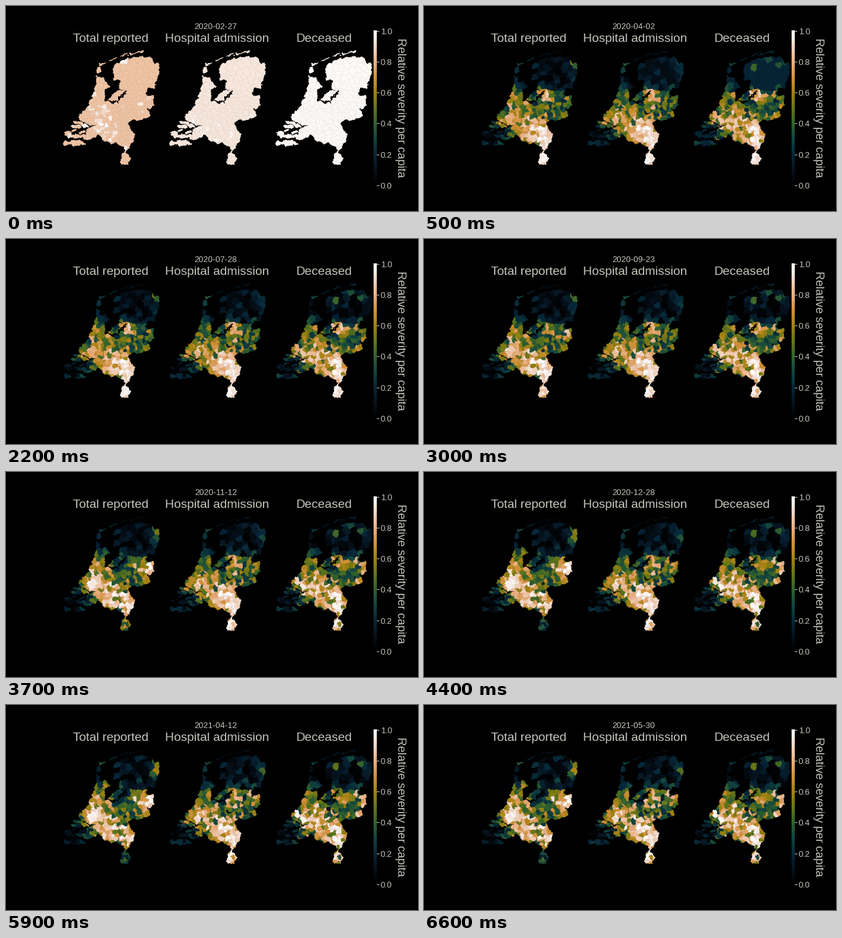
Recreate the animation shown at these times as a matplotlib script. Size 640x320 px, loop 6.7 s.

```python
import numpy as np
import matplotlib.pyplot as plt
from matplotlib.animation import FuncAnimation
from matplotlib.colors import LinearSegmentedColormap
from matplotlib.path import Path

W, H, DPI = 640, 320, 100
FRAMES, INTERVAL = 67, 100
INK = "#c6c6bd"
rng = np.random.default_rng(12)

plt.rcParams["font.family"] = "Liberation Sans"
cmap = LinearSegmentedColormap.from_list("dusk", [
    "#000000", "#06121d", "#06283a", "#12443f", "#31612f", "#667619",
    "#a0820f", "#d2913a", "#eab083", "#f2d6c4", "#ffffff"], N=512)

# Key points of the outline in degrees (lon, lat)
coast = [
    (4.25, 51.38), (4.28, 51.58), (4.44, 51.68), (4.73, 51.71), (4.38, 51.75),
    (4.07, 51.84), (3.98, 51.97), (4.25, 52.09), (4.40, 52.22), (4.58, 52.47),
    (4.73, 52.96), (4.92, 52.90), (5.03, 52.94), (5.08, 52.80), (5.30, 52.70),
    (5.04, 52.64), (5.08, 52.42), (5.07, 52.33), (5.45, 52.25), (5.67, 52.40),
    (5.84, 52.48), (5.89, 52.57), (5.60, 52.65), (5.59, 52.75), (5.70, 52.84),
    (5.40, 52.85), (5.41, 53.16), (5.55, 53.27), (5.95, 53.39), (6.87, 53.44),
    (6.95, 53.33), (7.20, 53.24)]
border = [
    (7.20, 53.00), (7.06, 52.64), (6.75, 52.64), (6.76, 52.46), (7.00, 52.46),
    (7.06, 52.24), (6.75, 52.11), (6.83, 51.97), (6.70, 51.90), (6.40, 51.84),
    (6.15, 51.88), (5.95, 51.79), (6.22, 51.48), (6.22, 51.37), (6.07, 51.20),
    (5.88, 51.06), (6.08, 50.92), (6.02, 50.76), (5.70, 50.76), (5.75, 51.00),
    (5.85, 51.15), (5.50, 51.29), (5.24, 51.27), (4.93, 51.40), (4.80, 51.50),
    (4.68, 51.43), (4.39, 51.36)]
polder = [
    (5.13, 52.37), (5.50, 52.58), (5.65, 52.61), (5.83, 52.58), (5.80, 52.50),
    (5.62, 52.41), (5.50, 52.32), (5.20, 52.33)]
# Rounded islands: lon, lat, half length and half width in pixels, slope
islands = [
    (3.80, 51.29, 17, 3.8, 0), (3.57, 51.51, 5.5, 4.5, 0), (3.96, 51.46, 13, 3.2, .1),
    (3.80, 51.59, 5, 1.6, 0), (3.91, 51.69, 8.5, 3, .2), (4.12, 51.56, 5, 2.8, 0),
    (4.11, 51.76, 11, 2.8, .35), (4.82, 53.10, 3, 6, 0)]


def barrier(lon):
    """Thin island on the northern arc."""
    return lon, 53.12 + .33 * np.sqrt(lon - 4.8), 6, 1.3, -.25


islands += [barrier(lon) for lon in (4.98, 5.35, 5.80, 6.20, 6.52)]


def project(points):
    lon, lat = np.asarray(points, float).T
    return np.column_stack([88 + (lon - 3.36) * 38.8, 248 - (lat - 50.75) * 63.2])


# Supersampled map grid with wobbly coordinates for ragged edges
X0, Y0, MW, MH, SS = 86, 69, 154, 181, 3
gx, gy = np.meshgrid(X0 + (np.arange(MW * SS) + .5) / SS,
                     Y0 + (np.arange(MH * SS) + .5) / SS)


def wobble():
    total = np.zeros_like(gx)
    for wave in np.geomspace(3.5, 16, 7):
        a, phase = rng.uniform(0, 2 * np.pi, 2)
        k = 2 * np.pi / wave
        total += .1 * wave ** .75 * np.sin(k * (gx * np.cos(a) + gy * np.sin(a)) + phase)
    return total


px, py = gx + wobble(), gy + wobble()
grid = np.column_stack([px.ravel(), py.ravel()])
land = np.zeros(px.shape, bool)
for shape in (coast + border, polder):
    land |= Path(project(shape)).contains_points(grid).reshape(px.shape)
for lon, lat, a, b, slope in islands:
    cx, cy = project([(lon, lat)])[0]
    dx = px - cx
    land |= np.abs(dx / a) ** 3 + np.abs((py - cy - slope * dx) / b) ** 3 < 1


def scatter_seeds():
    """Spread district centres, wider apart towards the north."""
    seeds = list(project([s[:2] for s in islands[-5:]]))
    inside = grid[land.ravel()]
    for p in inside[rng.integers(0, len(inside), 6000)]:
        gap = 4 + 3.6 * np.clip((165 - p[1]) / 60, 0, 1) + 2 * (p[0] < 125)
        if np.min(np.hypot(*(np.array(seeds) - p).T)) > gap:
            seeds.append(p)
    return np.array(seeds)


seeds = scatter_seeds()
count = len(seeds)
label = np.zeros(px.shape, int)
nearest = np.full(px.shape, np.inf)
for n, (sx, sy) in enumerate(seeds):
    d = (px - sx) ** 2 + (py - sy) ** 2 + rng.normal(0, 5)
    closer = d < nearest
    label[closer], nearest[closer] = n, d[closer]

seam = (label != np.roll(label, 1, 0)) | (label != np.roll(label, 1, 1))
shade = np.where(seam, .87, 1).astype(np.float32) * land
shade = shade[..., None]

# Hot and cold spots: lon, lat, radius, strength in the first and second wave
spots = np.array([
    (6.00, 53.20, .45, -1.1, -1.1), (4.90, 52.85, .25, -.6, -.5),
    (3.75, 51.45, .35, -.9, -1.0), (5.75, 51.55, .22, 1.3, .6),
    (6.00, 51.30, .15, 1.0, .9), (5.90, 50.88, .20, 1.5, -.5),
    (5.00, 51.85, .30, .5, .7), (4.10, 51.82, .12, 1.0, .1),
    (4.40, 51.97, .25, .2, .9), (4.90, 52.40, .15, .3, .5),
    (5.90, 52.48, .13, 1.4, 0), (6.80, 52.30, .20, 0, 1.4),
    (5.20, 51.45, .15, .4, .7), (6.70, 52.85, .30, -.6, -.5),
    (7.10, 53.05, .12, -.3, .6), (5.15, 52.70, .12, -.2, .8)])
gaps = seeds[:, None] - project(spots[:, :2])
dist = np.hypot(gaps[..., 0], gaps[..., 1])
bumps = np.exp(-(dist / (spots[:, 2] * 63.2)) ** 2 / 1.4)
first_wave, second_wave = (bumps @ spots[:, 3:]).T
outbreak = .6 * np.exp(-(np.hypot(*(seeds - (148, 188)).T) / 32) ** 2)
common = rng.normal(0, .2, count)


def ramp(i, start, end):
    return np.clip((i - start) / (end - start), 0, 1)


fig = plt.figure(figsize=(W / DPI, H / DPI), dpi=DPI, facecolor="black")
ax = fig.add_axes([0, 0, 1, 1])


def text(x, y, s, px_size, ha="center", va="baseline", **kw):
    return ax.text(x, y, s, fontsize=px_size * 72 / DPI, color=INK, ha=ha, va=va, **kw)


class Panel:
    def __init__(self, title, column, shift, noise, untouched, onset):
        self.untouched, self.onset = untouched, onset
        own = common + rng.normal(0, noise, count)
        self.early = outbreak + rng.normal(0, .35, count)
        self.spring = first_wave + own
        self.change = shift * (second_wave - first_wave)
        self.drift = rng.normal(0, .2, count)
        left = 165 * column
        self.image = ax.imshow(np.zeros((MH, MW, 3)), interpolation="nearest",
                               extent=(X0 + left, X0 + left + MW, Y0 + MH, Y0))
        text(162.5 + 165.5 * column, 56, title, 19.3)

    def draw(self, i):
        score = self.spring + ramp(i, 24, 42) * self.change + ramp(i, 22, 66) * self.drift
        score = self.early + ramp(i, 0, 5) * (score - self.early)
        rank = (score.argsort().argsort() + 1) / count
        # districts without cases share one tied rank
        tied = self.untouched * (1 + np.exp(-self.onset)) / (1 + np.exp(i * 1.3 - self.onset))
        colors = cmap(np.maximum(rank, tied))[:, :3].astype(np.float32)
        fine = colors[label] * shade
        self.image.set_data(fine.reshape(MH, SS, MW, SS, 3).mean((1, 3)))


panels = [
    Panel("Total reported", 0, 1, .18, .85, 2.5),
    Panel("Hospital admission", 1, .25, .2, .94, 4),
    Panel("Deceased", 2, .4, .3, .985, 5)]

# Colour bar
ax.imshow(np.linspace(1, 0, 242)[:, None], cmap=cmap, aspect="auto",
          extent=(571, 576, 280, 38))
for v in np.linspace(0, 1, 6):
    y = 280 - 241.5 * v
    ax.plot([576, 579], [y, y], color=INK, lw=.7)
    text(582, y + .5, f"{v:.1f}", 13, ha="left", va="center_baseline")
text(612, 159, "Relative severity per capita", 18.1, va="center", rotation=270)

date = text(326, 36, "", 12.9)
ax.set(xlim=(0, W), ylim=(H, 0), aspect="auto")
ax.axis("off")

START = np.datetime64("2020-02-27")
DATE_KEYS = [0, 11, 22, 37, 44, 52, 66]
DAYS = [0, 78, 152, 259, 305, 361, 458]


def update(i):
    day = int(round(np.interp(i, DATE_KEYS, DAYS)))
    date.set_text(str(START + np.timedelta64(day, "D")))
    for panel in panels:
        panel.draw(i)
    return [date, *(p.image for p in panels)]


anim = FuncAnimation(fig, update, frames=FRAMES, interval=INTERVAL, repeat=True)
plt.show()
```
